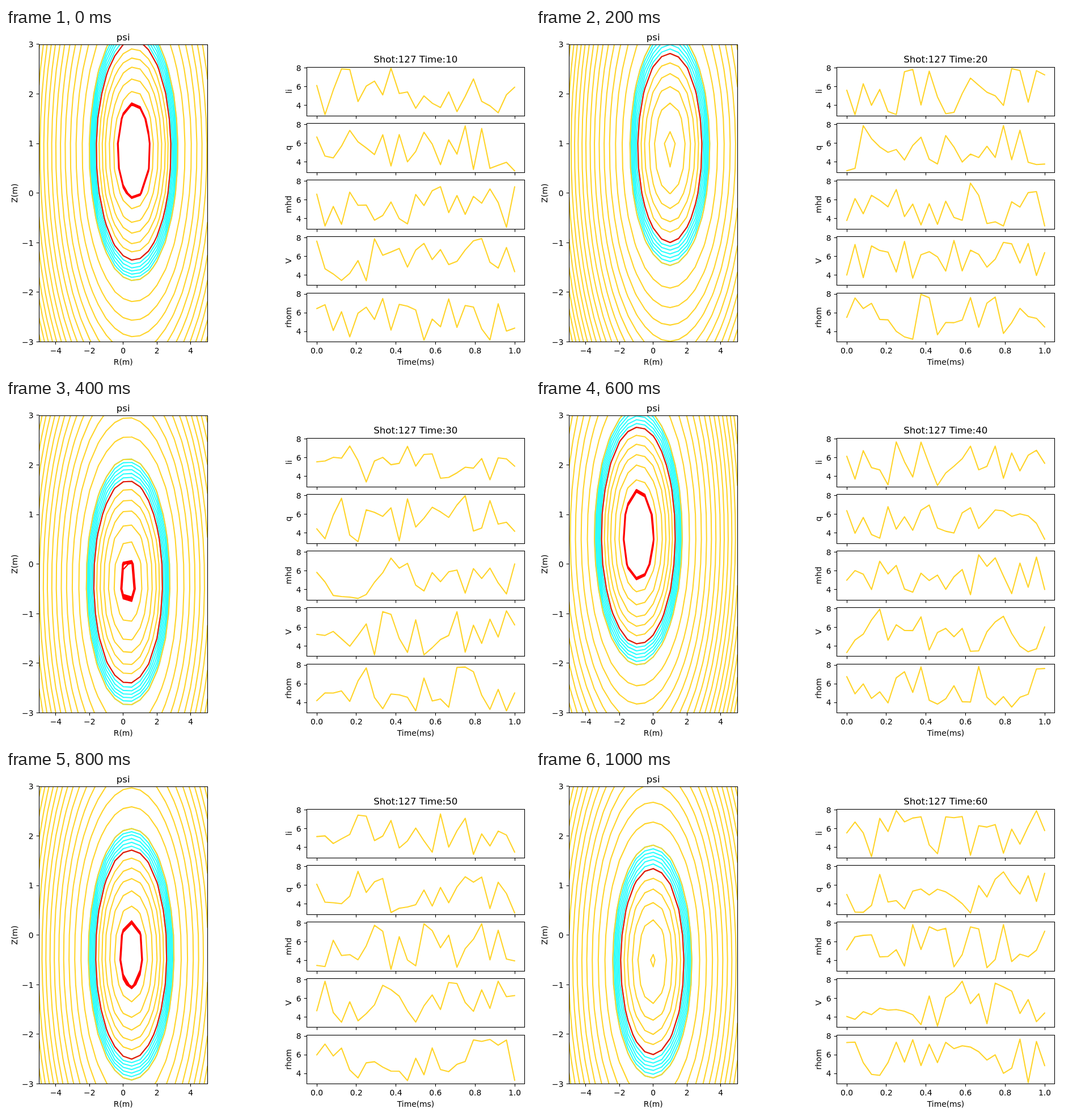
An HTML page for the animation above (1200 ms loop, 924x606 px).

```html
<!DOCTYPE html>
<html lang="en">
<head>
<meta charset="utf-8">
<title>psi</title>
<style>
  html, body { margin: 0; width: 100%; height: 100%; overflow: hidden; background: #fff; }
  svg { display: block; width: 100vw; height: 100vh; }
  text { font: 13.89px "DejaVu Sans", sans-serif; text-anchor: middle; }
  text.title { font-size: 16.67px; }
  text.end { text-anchor: end; }
  .axis { fill: none; stroke: #000; stroke-width: 1.11; }
  .line { fill: none; stroke-width: 2.08; stroke-linecap: round; stroke-linejoin: round; }
</style>
</head>
<body>
<svg id="stage" viewBox="0 0 924 606"></svg>
<script>
const GOLD = "#ffd42a", CYAN = "#2affff", RED = "#ff0000", EDGE = "#e81010";
const STEP_MS = 200, SAMPLES = 25;
const names = ["li", "q", "mhd", "V", "rhom"];
const stage = document.getElementById("stage");

function add(tag, attrs, parent = stage) {
  const el = document.createElementNS("http://www.w3.org/2000/svg", tag);
  for (const k in attrs) el.setAttribute(k, attrs[k]);
  parent.appendChild(el);
  return el;
}

function label(str, x, y, cls = "", turned = false) {
  const el = add("text", { x, y, class: cls });
  if (turned) el.setAttribute("transform", `rotate(-90 ${x} ${y})`);
  el.textContent = str;
  return el;
}

const linspace = (a, b, n) => Array.from({ length: n }, (_, i) => a + (b - a) * i / (n - 1));

function seeded(seed) {
  let s = seed;
  return () => {
    s = (s + 0x6d2b79f5) | 0;
    let t = Math.imul(s ^ (s >>> 15), 1 | s);
    t = (t + Math.imul(t ^ (t >>> 7), 61 | t)) ^ t;
    return ((t ^ (t >>> 14)) >>> 0) / 2 ** 32;
  };
}

// Flux map: a round well sampled on a coarse grid
const wells = [
  { r0: 0.617, z0: 0.86, edge: 4.95 },
  { r0: 0.986, z0: 0.918, edge: 3.665 },
  { r0: 0.29, z0: -0.36, edge: 4.22 },
  { r0: -0.88, z0: 0.579, edge: 4.83 },
  { r0: 0.469, z0: -0.385, edge: 4.475 },
  { r0: -0.055, z0: -0.531, edge: 3.565 }
];
const layers = [
  { color: CYAN, levels: linspace(0, 2, 7) },
  { color: GOLD, levels: linspace(2, 50, 21) },
  { color: GOLD, levels: linspace(-3.5, 0, 6) },
  { color: EDGE, levels: [0] },
  { color: RED, levels: linspace(-4.03, -3.96, 5) }
];
const H = 0.5;
const mapX = r => 206.75 + 29.7 * r;
const mapY = z => 291.75 - 87.6 * z;

// Marching squares over the grid, one short segment per crossed cell
function contour({ r0, z0, edge }, level) {
  const height = ([r, z]) => (r - r0) ** 2 + (z - z0) ** 2 - edge - level;
  let d = "";
  for (let r = -5; r < 5; r += H) {
    for (let z = -3; z < 3; z += H) {
      const corners = [[r, z], [r + H, z], [r + H, z + H], [r, z + H]];
      const hits = [];
      corners.forEach((a, i) => {
        const b = corners[(i + 1) % 4], u = height(a), v = height(b);
        if ((u < 0) === (v < 0)) return;
        const t = u / (u - v);
        const x = mapX(a[0] + t * (b[0] - a[0])), y = mapY(a[1] + t * (b[1] - a[1]));
        hits.push(x.toFixed(2) + " " + y.toFixed(2));
      });
      for (let i = 0; i + 1 < hits.length; i += 2) d += `M${hits[i]}L${hits[i + 1]}`;
    }
  }
  return d;
}

// Static axes, ticks and labels
const crisp = v => Math.floor(v) + 0.5;
const signed = v => String(v).replace("-", "\u2212");
const tickX = (x, y) => add("path", { class: "axis", d: `M${crisp(x)} ${y}v4.86` });
const tickY = (x, y) => add("path", { class: "axis", d: `M${x} ${crisp(y)}h-4.86` });

function clipBox(id, x, y, width, height) {
  add("rect", { x, y, width, height }, add("clipPath", { id }));
  return `url(#${id})`;
}

const mapClip = clipBox("map", 58.3, 29.2, 297, 525.3);
const mapLines = layers.map(l =>
  add("path", { class: "line", stroke: l.color, "clip-path": mapClip }));
add("rect", { class: "axis", x: 58.5, y: 29.5, width: 297, height: 525 });
for (let r = -4; r <= 4; r += 2) {
  tickX(mapX(r), 554.5);
  label(signed(r), mapX(r), 575);
}
for (let z = -3; z <= 3; z++) {
  tickY(58.5, mapY(z));
  label(signed(z), 48.5, mapY(z) + 5.2, "end");
}
label("psi", 206.75, 21.5, "title");
label("R(m)", 206.75, 594.5);
label("Z(m)", 19.5, 291.75, "", true);

const timeX = t => 548 + 349 * t;
const panelTop = k => 69.1 + 99.85 * k;
const panelMid = k => panelTop(k) + 42.9;
const valueY = (v, k) => panelMid(k) - 16.5 * (v - 5.5);

const traceLines = names.map((name, k) => {
  const top = crisp(panelTop(k)), bottom = crisp(panelTop(k) + 86.25);
  const clip = clipBox("panel" + k, 530.5, top, 384, bottom - top);
  const line = add("path", { class: "line", stroke: GOLD, "clip-path": clip });
  add("rect", { class: "axis", x: 530.5, y: top, width: 384, height: bottom - top });
  for (let i = 0; i <= 5; i++) {
    tickX(timeX(i / 5), bottom);
    if (k === names.length - 1) label((i / 5).toFixed(1), timeX(i / 5), 575);
  }
  for (const v of [4, 6, 8]) {
    tickY(530.5, valueY(v, k));
    label(v, 520.5, valueY(v, k) + 5.2, "end");
  }
  label(name, 503.5, panelMid(k), "", true);
  return line;
});
label("Time(ms)", 722.5, 594.5);
const heading = label("", 722.3, 61, "title");

// Noise readings, evenly spread between 3 and 8
function trace(n, k) {
  const random = seeded(1 + n * names.length + k);
  const pts = linspace(0, 1, SAMPLES).map(t =>
    timeX(t).toFixed(2) + " " + valueY(3 + 5 * random(), k).toFixed(2));
  return "M" + pts.join("L");
}

let shown = -1;
function draw(ms) {
  const n = Math.floor(ms / STEP_MS) % wells.length;
  if (n === shown) return;
  shown = n;
  layers.forEach((l, i) =>
    mapLines[i].setAttribute("d", l.levels.map(v => contour(wells[n], v)).join("")));
  traceLines.forEach((line, k) => line.setAttribute("d", trace(n, k)));
  heading.textContent = "Shot:127 Time:" + 10 * (n + 1);
}

const start = performance.now();
function tick() {
  draw(Math.max(0, performance.now() - start));
  requestAnimationFrame(tick);
}
draw(0);
requestAnimationFrame(tick);
</script>
</body>
</html>
```
